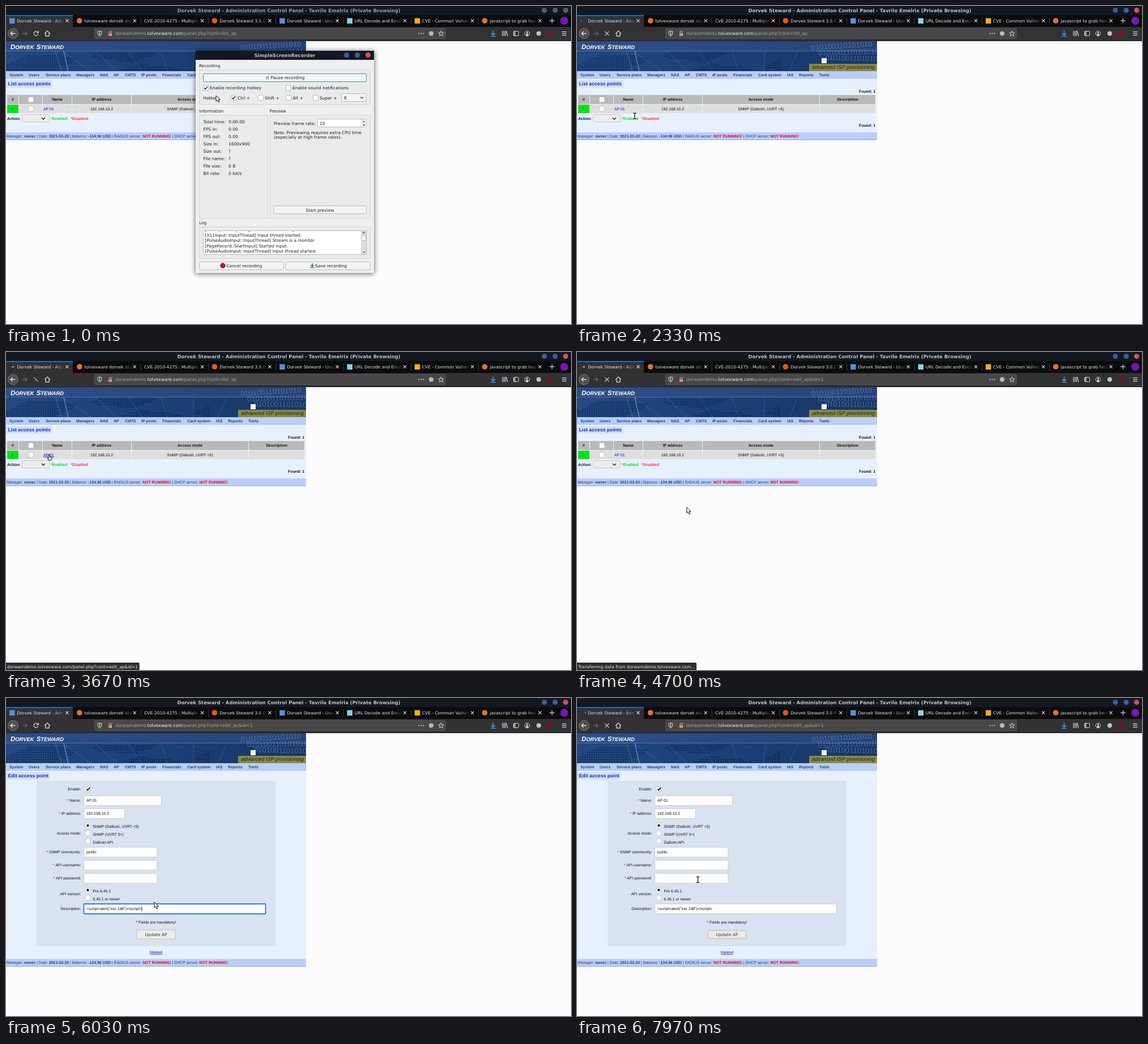
Recreate the animation shown at these times as an HTML page with a canvas. Size 998 px wide and 561 px high, loop 8000 ms.

```html
<!DOCTYPE html>
<html lang="en">
<head>
<meta charset="utf-8">
<title>Access point demo</title>
<style>
html, body { margin: 0; width: 100%; height: 100%; overflow: hidden; background: #fcfcfc; }
canvas { display: block; }
</style>
</head>
<body>
<canvas id="stage" width="998" height="561"></canvas>
<script>
const ctx = document.getElementById('stage').getContext('2d');
ctx.textRendering = 'geometricPrecision';

const LOOP = 8000, TAU = Math.PI * 2;
const UI = '"DejaVu Sans", sans-serif', WEB = '"Liberation Sans", Arial, sans-serif';
const UI_SIZE = 7.49, WEB_SIZE = 6.86;
const NAVY = '#1d3f7c', RED = '#e6001c', BAR = '#bacefa', LINK = '#1010c8';
const PRODUCT = 'Dorvek Steward', HOST = ['dorwamdemo.', 'tolvexware.com'];
const MODE = 'SNMP (Dalkotri, UVRT <5)';

// Moments at which the state changes, in ms
const DIALOG_END = 470, MENU = [790, 1920], EDIT_START = 4850, PASTE = 5600, SUBMIT = 7150;
const LOADS = [[1900, 2620], [3640, EDIT_START], [SUBMIT, LOOP]];
const PATH = [
  [0, 371, 158], [150, 371, 158], [450, 300, 150], [550, 300, 150], [820, 201, 125], [1250, 201, 125],
  [1700, 212, 131], [1950, 214, 133], [2330, 102, 194], [2600, 95, 190], [2950, 76, 181], [3700, 76, 181],
  [4250, 194, 274], [4850, 194, 274], [5250, 190, 371], [5600, 190, 371], [5950, 262, 360], [6100, 262, 360],
  [6660, 262, 406], [6900, 264, 414], [7200, 264, 414], [7970, 213.5, 320.5], [8000, 213.5, 320.5]
];

const within = (t, [a, b]) => t >= a && t < b;
const inBox = (p, x, y, w, h) => p.x >= x && p.x <= x + w && p.y >= y && p.y <= y + h;

function pointerAt(t) {
  const i = Math.max(1, PATH.findIndex(k => k[0] > t));
  const [t0, x0, y0] = PATH[i - 1], [t1, x1, y1] = PATH[i];
  const u = (t - t0) / (t1 - t0), e = u * u * (3 - 2 * u);
  return { x: x0 + (x1 - x0) * e, y: y0 + (y1 - y0) * e };
}

function rect(x, y, w, h, fill) {
  ctx.fillStyle = fill;
  ctx.fillRect(x, y, w, h);
}
function box(x, y, w, h, fill, border, radius = 1, width = 1) {
  ctx.beginPath();
  ctx.roundRect(x + .5, y + .5, w - 1, h - 1, radius);
  ctx.fillStyle = fill;
  ctx.fill();
  if (border) { ctx.strokeStyle = border; ctx.lineWidth = width; ctx.stroke(); }
}
function disc(x, y, r, fill, border) {
  ctx.beginPath();
  ctx.arc(x, y, r, 0, TAU);
  if (fill) { ctx.fillStyle = fill; ctx.fill(); }
  if (border) { ctx.strokeStyle = border; ctx.lineWidth = 1; ctx.stroke(); }
}
function line(color, width, ...pts) {
  ctx.beginPath();
  for (let i = 0; i < pts.length; i += 2) ctx.lineTo(pts[i], pts[i + 1]);
  ctx.strokeStyle = color;
  ctx.lineWidth = width;
  ctx.stroke();
}
// y is the middle of the capital letters; returns the width
function text(str, x, y, color, family, size, style = '', align = 'left') {
  ctx.font = `${style} ${size}px ${family}`;
  ctx.textAlign = align;
  ctx.fillStyle = color;
  ctx.fillText(str, x, y + size * .36);
  return ctx.measureText(str).width;
}
const ui = (s, x, y, color = '#1b1e20', align) => text(s, x, y, color, UI, UI_SIZE, '', align);
const web = (s, x, y, color = '#111', align) => text(s, x, y, color, WEB, WEB_SIZE, '', align);
const bold = (s, x, y, color = '#111', align) => text(s, x, y, color, WEB, WEB_SIZE, 'bold', align);

function tick(x, y, color = '#111', width = 1.3) {
  line(color, width, x - 2.6, y, x - .8, y + 2.2, x + 3, y - 2.6);
}
function checkbox(x, y, label, checked) {
  box(x - 5, y - 5, 10, 10, '#fff', '#b4b6b8');
  if (checked) tick(x, y);
  if (label) ui(label, x + 7, y);
}

/* ---------- browser window ---------- */
const TABS = [
  [PRODUCT + ' - Administration', 'square', '#5b8fd8'],
  ['tolvexware dorvek steward', 'circle', '#e2703a'],
  ['CVE-2010-4275 : Multiple vuln', '', ''],
  [PRODUCT + ' 3.8.0', 'circle', '#e0591c'],
  [PRODUCT + ' - User', 'square', '#5b8fd8'],
  ['URL Decode and Encode', 'square', '#8fd0ea'],
  ['CVE - Common Vulnerabilities', 'square', '#f5b016'],
  ['javascript to grab headers', 'circle', '#e2703a']
];

function tab([title, shape, color], i, t, loading) {
  const x = i * 119.3, bg = i ? '#0c0c0e' : '#323234';
  if (!i) { rect(0, 16, 118, 22, bg); rect(0, 16, 118, 1.5, '#0a84ff'); }
  else if (i > 1) rect(x - 1, 20, 1, 13, '#3a3a3d');
  if (!i && loading) {
    const phase = (t - 2330) / 1030 * TAU;
    const stretch = 1.2 + 1.6 * Math.abs(Math.sin(phase));
    box(11 - 3.5 * Math.cos(phase) - stretch, 25, stretch * 2, 2.5, '#cfd0d4', null, 1);
  } else if (shape === 'circle') disc(x + 10.5, 26, 4.8, color);
  else if (shape) rect(x + 6, 21.5, 9.5, 9.5, color);
  ctx.save();
  ctx.beginPath();
  ctx.rect(x, 16, 101.5, 22);
  ctx.clip();
  ui(title, x + (shape ? 19.3 : 5.5), 26, '#e4e4e6');
  const fade = ctx.createLinearGradient(x + 85, 0, x + 104, 0);
  fade.addColorStop(0, bg + '00');
  fade.addColorStop(1, bg);
  rect(x + 85, 18, 17, 19, fade);
  ctx.restore();
  cross(x + 108, 26, 2.6, '#d6d6d8');
}
function cross(x, y, r, color, part = 1) {
  line(color, 1.2, x - r, y - r, x + r, y + r);
  if (part === 1) line(color, 1.2, x + r, y - r, x - r, y + r);
}
function arrow(x, y, dir, color) {
  line(color, 1.3, x - 4 * dir, y, x + 4 * dir, y);
  line(color, 1.3, x + dir, y - 3.5, x + 4.3 * dir, y, x + dir, y + 3.5);
}

function toolbar(t, loading, loadStart) {
  const ink = '#d4d4d6';
  rect(0, 37, 998, 25, '#323234');
  rect(0, 61, 998, 1, '#1b1b1d');
  disc(12.5, 48.5, 9, '#505053', '#77777a');
  arrow(12.5, 48.5, -1, '#eee');
  arrow(33, 48.5, 1, '#6d6d70');
  if (loading) cross(53, 48.5, 3.6, ink, t - loadStart < 70 ? .5 : 1);
  else {
    ctx.beginPath();
    ctx.arc(53, 48.5, 3.8, .3, TAU - .7);
    ctx.strokeStyle = ink;
    ctx.lineWidth = 1.3;
    ctx.stroke();
    line(ink, 1.3, 57.3, 43.8, 57.3, 47.4, 53.8, 47.4);
  }
  line(ink, 1.3, 68, 49, 73, 44, 78, 49);
  line(ink, 1.3, 70, 48, 70, 53, 76, 53, 76, 48);

  box(156, 39, 621, 19, '#474749', '#555558', 2);
  line(ink, 1.1, 162, 45, 165.5, 44, 169, 45, 168.5, 49.5, 165.5, 53, 162.5, 49.5, 162, 45);
  line(ink, 1, 165.5, 45, 165.5, 51);
  rect(181, 48, 6, 4.5, '#b5b5b8');
  line('#b5b5b8', 1, 182, 48, 182, 45, 186, 45, 186, 48);
  line('#ff4060', 1.2, 180, 53, 188, 44);
  const page = t < 4300 ? 'list_ap' : 'edit_ap&id=1';
  let x = 193;
  for (const [part, color] of [[HOST[0], '#a5a5a8'], [HOST[1], '#f4f4f6'], ['/panel.php?cont=' + page, '#a5a5a8']])
    x += text(part, x, 48.5, color, UI, 7.86);
  for (const dx of [-4, 0, 4]) disc(733.5 + dx, 48.5, 1.1, ink);
  disc(751, 48.5, 4, '#b9b9bc');
  ctx.beginPath();
  for (let i = 0; i < 10; i++) {
    const r = i % 2 ? 2.1 : 5, a = i * TAU / 10 - TAU / 4;
    ctx.lineTo(768.5 + r * Math.cos(a), 48.8 + r * Math.sin(a));
  }
  ctx.closePath();
  ctx.strokeStyle = ink;
  ctx.lineWidth = 1;
  ctx.stroke();

  line('#45a1ff', 1.4, 860.5, 43.5, 860.5, 51);
  line('#45a1ff', 1.4, 857, 48, 860.5, 51.5, 864, 48);
  line('#45a1ff', 1.2, 856, 53.5, 865, 53.5);
  for (const dx of [0, 2.6, 5.2]) line(ink, 1.2, 877 + dx, 44, 877 + dx, 53);
  line(ink, 1.2, 883.5, 44, 886, 53);
  box(896, 44, 10, 9, '#323234', ink);
  rect(897, 45, 3, 7, '#9a9a9d');
  disc(920.5, 48.5, 4.3, null, ink);
  disc(920.5, 47, 1.6, ink);
  disc(920.5, 51, 2.2, ink);
  disc(941, 48.5, 4, '#c4c4c6');
  disc(960.5, 48.5, 4.6, '#800f16');
  for (const dy of [-3, 0, 3]) line(ink, 1.2, 982, 48.5 + dy, 990, 48.5 + dy);
}

function browser(t, focused, load) {
  rect(0, 0, 998, 16, '#141820');
  text(PRODUCT + ' - Administration Control Panel - Tavrilo Emelrix (Private Browsing)',
    499.5, 8, focused ? '#bcc2cc' : '#969ca6', UI, 8.43, 'bold', 'center');
  disc(951, 7.5, 4.5, focused ? '#3e5f9e' : '#59606c');
  disc(970, 7.5, 4.5, focused ? '#3e5f9e' : '#59606c');
  disc(988.5, 7.5, 4.5, focused ? '#d0535f' : '#59606c');
  rect(0, 16, 998, 21, '#0c0c0e');
  TABS.forEach((item, i) => tab(item, i, t, load));
  line('#d6d6d8', 1.2, 960, 26, 969, 26);
  line('#d6d6d8', 1.2, 964.5, 21.5, 964.5, 30.5);
  disc(986, 26, 7, '#7416b8');
  toolbar(t, !!load, load ? load[0] : 0);
}

/* ---------- web page ---------- */
function banner() {
  const sky = ctx.createLinearGradient(0, 62, 530, 114);
  sky.addColorStop(0, '#234a82');
  sky.addColorStop(.45, '#1c4078');
  sky.addColorStop(1, '#183666');
  ctx.save();
  ctx.beginPath();
  ctx.rect(0, 62, 530, 53);
  ctx.clip();
  rect(0, 62, 530, 53, sky);
  // dotted continents
  for (let x = 1; x < 360; x += 4)
    for (let y = 83; y < 114; y += 4)
      if (Math.sin(x / 29) + Math.sin(y / 8 + x / 47) > .1) rect(x, y, 2.6, 2.6, 'rgba(8,24,62,.45)');
  for (let i = 0; i < 6; i++) line('rgba(130,170,225,.12)', 2, 150 + i * 45, 115, 100 + i * 58, 80);
  line('rgba(190,215,250,.45)', 1.5, 98, 62, 110, 115);
  line('rgba(150,185,235,.25)', 1.5, 82, 62, 98, 115);
  const band = ctx.createLinearGradient(0, 0, 530, 0);
  band.addColorStop(0, '#375994');
  band.addColorStop(1, 'rgba(52,84,140,.7)');
  rect(0, 62, 530, 17, band);
  for (let y = 63; y < 79; y += 3) rect(0, y, 530, 1.4, 'rgba(16,38,82,.45)');
  rect(0, 79, 530, 1, '#5878ab');
  for (let i = 0; i < 3; i++) {
    ctx.save();
    ctx.translate(414 + i * 12, 73 + i * 9);
    ctx.rotate(-.06 + i * .04);
    text('010100110101010', 0, 0, 'rgba(140,170,220,.42)', WEB, 13);
    ctx.restore();
  }
  let x = 8;
  for (const word of PRODUCT.toUpperCase().split(' ')) {
    x += text(word[0], x, 72, '#fff', WEB, 11.5, 'italic bold');
    x += text(word.slice(1), x, 72.7, '#fff', WEB, 9.4, 'italic bold') + 4;
  }
  rect(432, 92, 9, 9, '#f2f5fb');
  rect(410, 102, 120, 13, '#8b8940');
  text('advanced ISP provisioning', 526, 108, '#14233f', WEB, 9.4, 'italic', 'right');
  ctx.restore();
}

function navigation(title) {
  rect(0, 115, 530, 13, BAR);
  rect(0, 127, 530, 1, '#a3bbec');
  const items = { System: 6, Users: 40, 'Service plans': 70, Managers: 124, NAS: 166, AP: 190, CMTS: 210,
    'IP pools': 239, Financials: 276, 'Card system': 320, IAS: 371, Reports: 392, Tools: 428 };
  for (const [name, x] of Object.entries(items)) bold(name, x, 121.5, NAVY);
  const width = title.startsWith('List') ? 81 : 77;
  rect(0, 131, width, 13, '#d3e1f6');
  text(title, 3.5, 137, '#0a2fc4', WEB, 8.7, 'bold');
}

function dropdown(pointer) {
  box(186, 115, 18, 13, '#c9daff', '#9db5e4', 0);
  bold('AP', 190, 121.5, NAVY);
  box(185, 127, 72, 25, BAR, '#90a9dc', 0);
  if (inBox(pointer, 186, 129, 70, 10)) rect(186, 128, 70, 11, '#d5e2ff');
  bold('List access points', 193, 133.5, NAVY);
  bold('New access point', 193, 145.5, NAVY);
}

function footer(y) {
  rect(0, y, 530, 13, BAR);
  rect(0, y + 12.5, 530, 1, '#8ba6da');
  let x = 1;
  const parts = ['Manager: ', 'owner', ' | Date: ', '2021-03-20', ' | Balance: ', '-134.96 USD',
    ' | RADIUS server: ', 'NOT RUNNING!', ' | DHCP server: ', 'NOT RUNNING!'];
  parts.forEach((part, i) => {
    x += (i % 2 ? bold : web)(part, x, y + 6.3, i === 7 || i === 9 ? RED : NAVY);
  });
}

function listPage(hoverLink) {
  rect(0, 128, 530, 95, '#e7f0fd');
  navigation('List access points');
  for (const y of [150.2, 210.7]) bold('Found: 1', 527, y, '#111', 'right');
  const edges = [2, 23, 65, 117, 222, 429, 528];
  const heads = ['#', '', 'Name', 'IP address', 'Access mode', 'Description'];
  heads.forEach((head, i) => {
    const x = edges[i], w = edges[i + 1] - x - 1, mid = x + w / 2;
    rect(x, 157, w, 16, '#b9b9b9');
    rect(x, 174, w, 15, i ? '#dededd' : '#08e21c');
    bold(head, mid, 164.7, '#111', 'center');
  });
  for (const y of [165, 181.5]) box(39, y - 5, 10, 10, '#fbfbfb', '#c4c4c4', 2);
  web('1.', 12, 181.5, '#0a5a12', 'center');
  const w = web('AP 01', 66, 181.5, LINK);
  if (hoverLink) rect(66, 184.6, w, .8, LINK);
  web('192.168.10.2', 169, 181.5, '#111', 'center');
  web(MODE, 325, 181.5, '#111', 'center');
  bold('Action:', 2, 198.2);
  box(28, 191, 49, 14, '#ececec', '#c6c6c6', 2);
  line('#222', 1.4, 63, 197, 66, 200, 69, 197);
  bold('*Enabled', 79, 198.2, '#14d32a');
  bold('*Disabled', 114, 198.2, '#f23a3a');
  footer(223);
}

function label(str, y, required) {
  web(str, 132.5, y, '#111', 'right');
  if (required) web('* ', 132.5 - ctx.measureText(str).width, y, RED, 'right');
}
function field(y, width, value, focused) {
  const h = 18.5;
  box(137, y - h / 2, width, h, '#fdfdfd', focused ? '#2b7bd0' : '#c8ccd2', 1, focused ? 1.8 : 1);
  return 142 + web(value, 142, y);
}
function radio(y, caption, on) {
  disc(144.5, y, 4.8, '#fdfdfd', '#c2c6cb');
  if (on) disc(144.5, y, 2.2, '#1a1a1a');
  web(caption, 153.5, y + 2);
}

function editPage(t) {
  rect(0, 128, 530, 333, '#e7f0fd');
  navigation('Edit access point');
  rect(54, 146, 422, 292, '#d8e2f0');
  label('Enable:', 160.8);
  box(139.5, 155.5, 10, 10, '#fdfdfd', '#c6cad0', 2);
  tick(145, 160.5, '#111', 1.7);
  label('Name:', 181, true);
  field(181, 138, 'AP 01');
  label('IP address:', 204, true);
  field(204, 73, '192.168.10.2');
  label('Access mode:', 238.2);
  radio(225, MODE, true);
  radio(238.5, 'SNMP (UVRT 5+)');
  radio(252.5, 'Dalkotri API');
  label('SNMP community:', 272, true);
  field(272, 130.5, 'public');
  label('API username:', 295, true);
  field(295, 130.5, '');
  label('API password:', 318, true);
  field(318, 130.5, '');
  label('API version:', 345.3);
  radio(338.7, 'Pre 6.45.1', true);
  radio(352.5, '6.45.1 or newer');
  label('Description:', 372);
  const focused = t >= 5350 && t < SUBMIT;
  const end = field(372, 322, t < PASTE ? '' : '<script>alert("xss 1d8")<\/script>', focused);
  if (focused && (t - PASTE + 1000) % 1000 < 500) rect(end + .3, 368, .9, 8, '#111');
  web('* Fields are mandatory!', 265, 395.3, '#111', 'center');
  box(230, 409, 70, 16.5, '#ececea', '#c3c3c2', 2);
  if (t >= SUBMIT) box(231.5, 410.5, 67, 13.5, '#ececea', '#c0c0be', 1, .8);
  ui('Update AP', 265, 417.5, '#2e3436', 'center');
  let x = 254;
  x += web('[', x, 448.7);
  const w = web('delete', x, 448.7, LINK);
  rect(x, 452, w, .7, LINK);
  web(']', x + w, 448.7);
  footer(460.3);
}

function status(str) {
  ctx.font = `${UI_SIZE}px ${UI}`;
  box(-2, 548, ctx.measureText(str).width + 6.5, 15, '#2f2f31', '#1c1c1e', 1);
  ui(str, 2, 555, '#ededee');
}

/* ---------- recorder dialog ---------- */
function group(title, x, y, w, h) {
  ui(title, x, y - 7);
  box(x, y, w, h, '#e9eaea', '#d3d5d6', 1);
}
function button(str, x, y, w, border = '#b9bbbd') {
  box(x, y, w, 15, '#f3f4f4', border, 2);
  ui(str, x + w / 2 + 5, y + 7.5, '#1b1e20', 'center');
}

function dialog() {
  ctx.save();
  ctx.shadowColor = 'rgba(0,0,0,.65)';
  ctx.shadowBlur = 9;
  ctx.shadowOffsetY = 1;
  rect(335, 79, 315, 392, '#efefef');
  ctx.restore();
  rect(335, 79, 315, 16, '#141820');
  text('SimpleScreenRecorder', 492.5, 87, '#bcc2cc', UI, 8.43, 'bold', 'center');
  disc(601.5, 86.5, 4.5, '#3e5f9e');
  disc(620.5, 86.5, 4.5, '#3e5f9e');
  disc(639.5, 86.5, 4.5, '#d0535f');

  group('Recording', 341, 112, 303, 62);
  button('Pause recording', 348, 119, 289, '#4b86b4');
  rect(459.5, 124, 1.7, 5.5, '#85898c');
  rect(462.5, 124, 1.7, 5.5, '#85898c');
  checkbox(353, 144.5, 'Enable recording hotkey', true);
  checkbox(499, 144.5, 'Enable sound notifications');
  ui('Hotkey:', 348.5, 162);
  checkbox(402, 162, 'Ctrl +', true);
  checkbox(450, 162, 'Shift +');
  checkbox(499, 162, 'Alt +');
  checkbox(547, 162, 'Super +');
  box(592, 154, 45, 15, '#f3f4f4', '#b9bbbd', 2);
  ui('R', 597, 162);
  line('#444', 1.2, 626, 160.5, 628.5, 163, 631, 160.5);

  group('Information', 341, 192, 122, 183);
  const info = [['Total time:', '0:00:00'], ['FPS in:', '0.00'], ['FPS out:', '0.00'], ['Size in:', '1600x900'],
    ['Size out:', '?'], ['File name:', '?'], ['File size:', '0 B'], ['Bit rate:', '0 bit/s']];
  info.forEach(([name, value], i) => {
    ui(name, 348.5, 204 + i * 13.1);
    ui(value, 393, 204 + i * 13.1);
  });

  group('Preview', 465.5, 192, 178.5, 183);
  ui('Preview frame rate:', 473, 207);
  box(550, 199, 87, 15, '#fff', '#b9bbbd', 2);
  ui('10', 554, 207);
  rect(627, 200, 1, 13, '#c9cbcc');
  line('#444', 1.1, 630, 205, 632, 203, 634, 205);
  line('#444', 1.1, 630, 209, 632, 211, 634, 209);
  ui('Note: Previewing requires extra CPU time', 473, 223);
  ui('(especially at high frame rates).', 473, 231.5);
  box(472.5, 352, 164.5, 15, '#f3f4f4', '#b9bbbd', 2);
  ui('Start preview', 554.5, 360, '#1b1e20', 'center');

  group('Log', 341, 389, 303, 57);
  box(348, 396, 289, 43, '#fff', '#b9bbbd', 1);
  ctx.save();
  ctx.beginPath();
  ctx.rect(349, 397, 278, 41);
  ctx.clip();
  ['[X11Input::Init] Using X11 shared memory.', '[X11Input::InputThread] Input thread started.',
    '[PulseAudioInput::InputThread] Stream is a monitor.', '[PageRecord::StartInput] Started input.',
    '[PulseAudioInput::InputThread] Input thread started.'
  ].forEach((row, i) => ui(row, 351.5, 394.8 + i * 9.35));
  ctx.restore();
  rect(627, 397, 9, 41, '#dcdddd');
  box(627, 404, 9, 10, '#f3f4f4', '#b9bbbd');
  box(627, 429, 9, 9, '#f3f4f4', '#b9bbbd');
  line('#444', 1.1, 630, 401, 632, 399, 634, 401);
  line('#444', 1.1, 630, 433, 632, 435, 634, 433);

  button('Cancel recording', 341, 451, 150);
  disc(383, 458, 4.2, '#c8102a', '#6e1a20');
  button('Save recording', 494, 451, 150);
  line('#3b9a2e', 2, 541, 454, 541, 459);
  line('#3b9a2e', 1.6, 538, 457, 541, 460, 544, 457);
  line('#777', 1.4, 537, 461.5, 545, 461.5);
}

/* ---------- pointer ---------- */
function pointer({ x, y }, kind) {
  ctx.save();
  ctx.translate(x, y);
  if (kind === 'beam') {
    for (const [color, width] of [['#fff', 3], ['#222', 1.4]]) {
      line(color, width, 0, -5, 0, 5);
      line(color, width, -2.8, -5, 2.8, -5);
      line(color, width, -2.8, 5, 2.8, 5);
    }
  } else {
    const shape = kind === 'hand'
      ? 'M-1 0H1V4L5 5V8L4 10H-1L-3 6L-1 6.5Z'
      : 'M0 0V10L2.4 8L4.2 12L6 11.2L4.3 7.4H7.2Z';
    const path = new Path2D(shape);
    ctx.fillStyle = '#fff';
    ctx.fill(path);
    ctx.strokeStyle = '#111';
    ctx.lineWidth = 1;
    ctx.stroke(path);
  }
  ctx.restore();
}

function pointerKind(p, editing, menuOpen, overLink) {
  if (overLink || menuOpen && inBox(p, 186, 129, 70, 22)) return 'hand';
  const overText = editing
    ? inBox(p, 137, 363, 322, 18) || inBox(p, 137, 309, 130, 18)
    : inBox(p, 79, 186, 67, 17);
  return overText ? 'beam' : 'arrow';
}

function draw() {
  const t = performance.now() % LOOP;
  const p = pointerAt(t);
  const dialogOpen = t < DIALOG_END, menuOpen = within(t, MENU), editing = t >= EDIT_START;
  const overLink = !editing && inBox(p, 66, 177, 19, 9);
  const address = HOST.join('') + '/panel.php?cont=';

  rect(0, 0, 998, 561, '#fcfcfc');
  browser(t, !dialogOpen, LOADS.find(span => within(t, span)));
  banner();
  if (editing) editPage(t); else listPage(overLink);
  if (menuOpen) dropdown(p);
  if (within(t, [1720, MENU[1]])) status(address + 'list_ap');
  else if (overLink) status(address + 'edit_ap&id=1');
  else if (within(t, [4300, EDIT_START])) status('Transferring data from ' + HOST.join('') + '...');
  if (dialogOpen) dialog();
  pointer(p, pointerKind(p, editing, menuOpen, overLink));
  requestAnimationFrame(draw);
}
requestAnimationFrame(draw);
</script>
</body>
</html>
```
